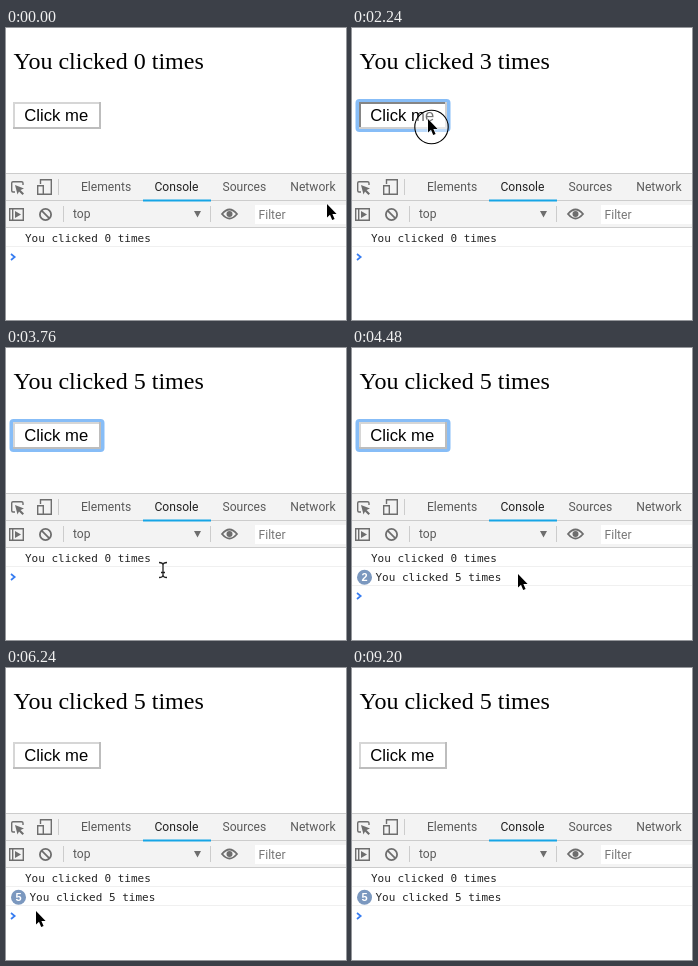
Recreate the animation shown at these times as an HTML page. Size 340x292 px, loop 9.28 s.

```html
<!DOCTYPE html>
<html lang="en">
<head>
<meta charset="utf-8">
<title>Click counter and console</title>
<style>
  html, body { margin: 0; width: 100%; height: 100%; overflow: hidden; background: #fff; }
  svg { display: block; }
  text { white-space: pre; }
  .page { font: 24px "Liberation Serif", Times, serif; }
  .button { font: 16.67px "Liberation Sans", Arial, sans-serif; }
  .ui { font: 12.1px Roboto, sans-serif; fill: #5a5a5a; }
  .log { font: 11px "DejaVu Sans Mono", monospace; fill: #222; }
  .badge { font: bold 11px "Liberation Sans", Arial, sans-serif; fill: #fff; text-anchor: middle; }
  .icon { fill: none; stroke: #6e6e6e; stroke-width: 1.4; }
</style>
</head>
<body>
<svg width="340" height="292" viewBox="0 0 340 292">
  <defs><filter id="soft" x="-20%" y="-40%" width="140%" height="180%"><feGaussianBlur stdDeviation=".6"/></filter></defs>

  <text id="heading" class="page" x="7.5" y="41"></text>
  <rect id="focus" x="3.5" y="71" width="95" height="33" rx="4" fill="#87bdf7" filter="url(#soft)"/>
  <rect x="7" y="74" width="88" height="27" fill="#fff"/>
  <path id="edgeTop" d="M8 101V75H95" fill="none" stroke-width="2"/>
  <path id="edgeBottom" d="M7 100H94V74" fill="none" stroke-width="2"/>
  <text class="button" x="18.3" y="93">Click me</text>

  <rect y="145" width="340" height="55" fill="#f3f3f3"/>
  <path d="M0 145.5H340M0 172.5H340M0 199.5H340M52.5 151V167M57.5 178V194M204.5 178V194" stroke="#ccc"/>
  <rect x="249" y="177" width="91" height="19" fill="#fff"/>
  <rect x="137" y="171.5" width="68" height="2" fill="#16a5e6"/>
  <g class="ui">
    <text x="75" y="163">Elements</text>
    <text x="148.5" y="163" fill="#222" style="fill:#222">Console</text>
    <text x="216.5" y="163">Sources</text>
    <text x="284.3" y="163">Network</text>
    <text x="67" y="190">top</text>
    <text x="252.5" y="191" style="fill:#777">Filter</text>
  </g>
  <g class="icon">
    <path d="M9 164H7Q5.700 164 5.700 162.500V155Q5.700 153.700 7 153.700H15.500Q17 153.700 17 155V157"/>
    <path d="M34.500 156V151.700H45.300V166.300H38M31.700 157.700H37.300V166.300H31.700Z"/>
    <path d="M3.700 180.700H17.300V192.300H3.700ZM6.700 181V192"/>
    <circle cx="39.500" cy="186.500" r="5.600" stroke-width="1.800"/>
    <path d="M35.600 182.600L43.400 190.400" stroke-width="1.800"/>
    <path d="M216 186Q223.500 177 231 186Q223.500 195 216 186Z" stroke-width="1.800"/>
  </g>
  <path d="M9 157L18 160.500L14.500 162L18 165.500L16.500 167L13 163.500L11.500 166.500Z
           M9 183L15 186.500L9 190ZM188 183H195L191.500 189.500Z" fill="#6e6e6e"/>
  <circle cx="223.500" cy="186" r="3" fill="#6e6e6e"/>

  <text class="log" x="19" y="214">You clicked 0 times</text>
  <path d="M0 218.500H340" stroke="#f0f0f0"/>
  <g id="entry">
    <path d="M0 237.500H340" stroke="#f0f0f0"/>
    <text id="entryText" class="log" y="233">You clicked 5 times</text>
    <g id="badge">
      <circle cx="12.500" cy="229.300" r="7.500" fill="#7b98bf"/>
      <text id="repeats" class="badge" x="12.500" y="233.300"></text>
    </g>
  </g>
  <path id="prompt" d="M5 226L8.700 229L5 232" fill="none" stroke="#367cf1" stroke-width="1.700"/>
  <path id="caret" d="M19.500 241V254" stroke="#000"/>

  <g id="pointer">
    <circle id="ring" cx="3.500" cy="8" r="16.700" fill="#fff" fill-opacity=".45" stroke="#000" stroke-width="1.100"/>
    <path id="arrow" d="M0 0V13.500L3 10.800L5.200 16L7.600 15L5.400 9.900H9.600Z" fill="#000" stroke="#fff" stroke-width="1" paint-order="stroke"/>
    <g id="beam" fill="none">
      <path d="M-4 -7.500Q0 -7.500 0 -5V5Q0 7.500 -4 7.500M4 -7.500Q0 -7.500 0 -5V5Q0 7.500 4 7.500M-2 2.500H2" stroke="#fff" stroke-width="3"/>
      <path d="M-4 -7.500Q0 -7.500 0 -5V5Q0 7.500 -4 7.500M4 -7.500Q0 -7.500 0 -5V5Q0 7.500 4 7.500M-2 2.500H2" stroke="#222" stroke-width="1.300"/>
    </g>
  </g>
</svg>
<script>
const LOOP = 9280, STEP = 80;

// Pointer stops: time, x, y
const stops = [
  [0, 321, 176], [320, 285, 153], [400, 285, 153], [800, 76, 91],
  [2720, 76, 91], [3520, 157, 224], [3760, 157, 222], [4000, 157, 222],
  [4480, 166, 226], [5680, 166, 226], [6240, 30, 243], [6400, 30, 243],
  [6640, 27, 243], [6800, 27, 243], [7200, 22, 240], [7520, 22, 240],
  [7760, 25, 240], [7840, 25, 240], [8640, 220, 300]
];
const presses = [[880, 960], [1360, 1520], [1840, 1920], [2240, 2320], [2640, 2720], [5600, 5680]];
const clicks = presses.slice(0, 5).map(press => press[1]);
const logs = [3920, 4480, 4800, 5200, 5680];

const el = {};
document.querySelectorAll('[id]').forEach(node => el[node.id] = node);
const show = (node, on) => node.setAttribute('visibility', on ? 'inherit' : 'hidden');
const within = (t, from, to) => t >= from && t < to;
const countUntil = (times, t) => times.filter(time => time <= t).length;

function pointerAt(t) {
  const next = stops.findIndex(stop => stop[0] > t);
  if (next < 0) return stops[stops.length - 1].slice(1);
  const [t0, x0, y0] = stops[next - 1], [t1, x1, y1] = stops[next];
  const p = (t - t0) / (t1 - t0), ease = p * p * (3 - 2 * p);
  return [x0 + (x1 - x0) * ease, y0 + (y1 - y0) * ease];
}

function draw(t) {
  const [x, y] = pointerAt(t);
  const pressed = presses.some(([down, up]) => within(t, down, up));
  const focused = within(t, clicks[0], 5600);
  const logged = countUntil(logs, t);
  const beam = within(t, 2720, 4160) && y > 200;

  el.heading.textContent = `You clicked ${countUntil(clicks, t)} times`;
  show(el.focus, focused);
  const sunken = focused && pressed;
  el.edgeTop.setAttribute('stroke', sunken ? '#858585' : '#d6d6d6');
  el.edgeBottom.setAttribute('stroke', sunken ? '#d0d0d0' : '#bdbdbd');

  show(el.entry, logged > 0);
  show(el.badge, logged > 1);
  el.entryText.setAttribute('x', logged > 1 ? 23.5 : 19);
  el.repeats.textContent = logged;
  el.prompt.setAttribute('transform', `translate(0 ${logged ? 19 : 0})`);
  show(el.caret, t >= 5600 && (t - 5400) % 1060 < 530);

  el.pointer.setAttribute('transform', `translate(${x} ${y})`);
  show(el.ring, pressed);
  show(el.arrow, !beam);
  show(el.beam, beam);
}

const start = performance.now();
function frame() {
  const t = (performance.now() - start) % LOOP;
  draw(Math.floor(t / STEP) * STEP);
  requestAnimationFrame(frame);
}
frame();
</script>
</body>
</html>
```
